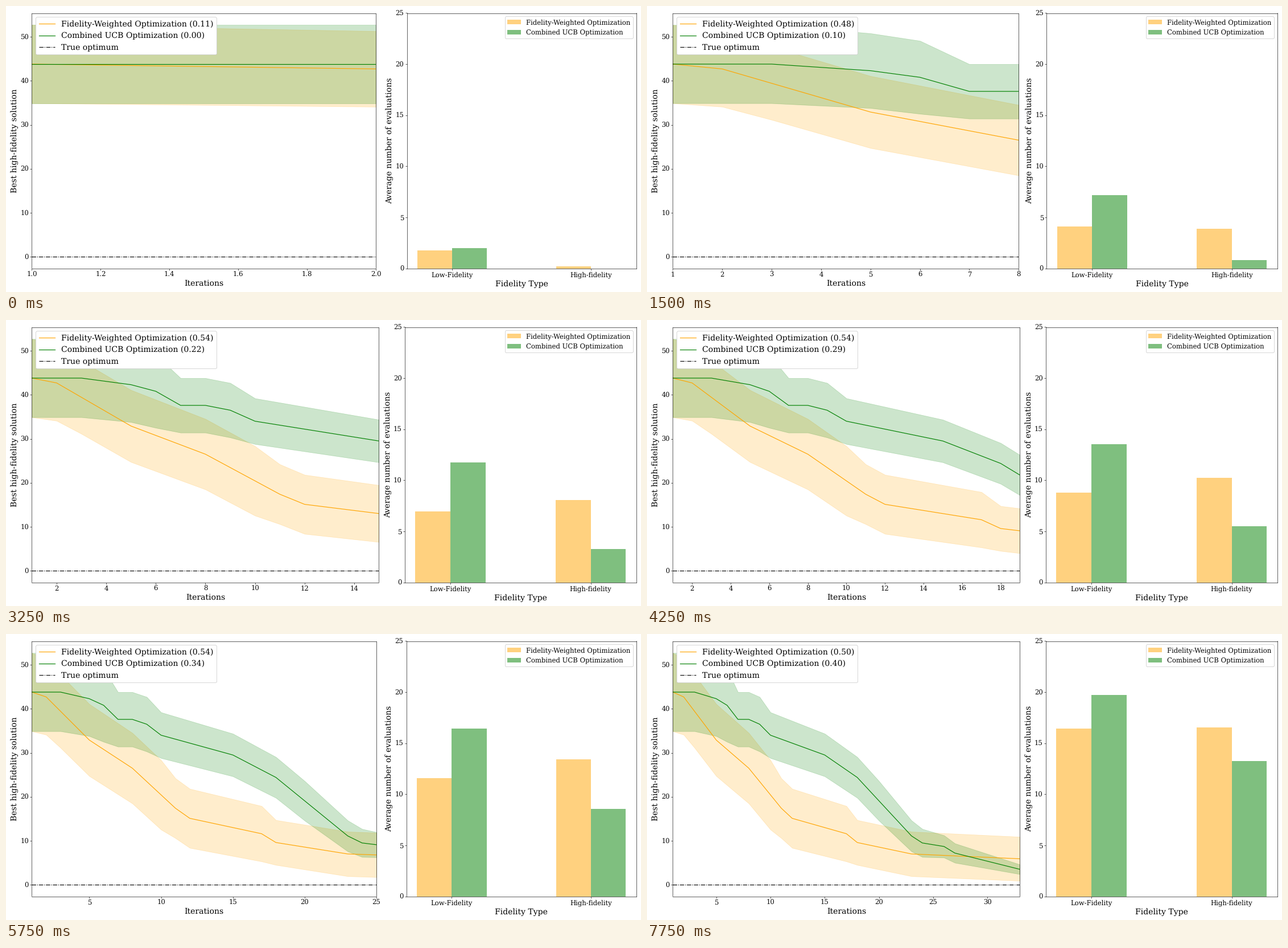
A matplotlib script for the animation above (8 s loop, 1116 by 502 pixels).

```python
import numpy as np
import matplotlib.pyplot as plt
from matplotlib.animation import FuncAnimation

WIDTH, HEIGHT, DPI = 1116, 502, 64
SCALE = WIDTH / 20 / DPI  # sizes below are given for a 20 inch wide figure
SMALL, LARGE = 15 * SCALE, 18 * SCALE
TOP, BOTTOM = 12.5, 460.5  # axes edges in pixels from the top
FRAMES, INTERVAL = 32, 250

for key in ("font.size", "lines.linewidth", "patch.linewidth", "axes.linewidth",
            "axes.labelpad", "xtick.major.size", "xtick.major.pad",
            "xtick.major.width", "ytick.major.size", "ytick.major.pad",
            "ytick.major.width"):
    plt.rcParams[key] *= SCALE
plt.rcParams.update({
    "font.family": "DejaVu Serif",
    "text.hinting": "none",  # keeps text heights fractional
    "axes.labelsize": LARGE,
    "xtick.labelsize": SMALL,
    "ytick.labelsize": SMALL,
    "legend.framealpha": 1,
})

iters = np.arange(1, FRAMES + 2)


def track(*points):
    """Value at every iteration, straight between (iteration, value) points."""
    return np.interp(iters, *zip(*points))


class Method:
    def __init__(self, name, color, mean, spread, high):
        self.name, self.color = name, color
        self.mean, self.spread, self.high = mean, spread, high


weighted = Method(
    "Fidelity-Weighted Optimization", "orange",
    mean=track((1, 43.8), (2, 42.7), (5, 32.9), (8, 26.5), (11, 17.4),
               (12, 15.1), (17, 11.6), (18, 9.6), (23, 7), (33, 5.9)),
    spread=track((1, 8.9), (3, 8.3), (10, 7.9), (11, 6.8), (17, 6.3),
                 (18, 5.1), (33, 5)),
    high=track((2, 0.22), (5, 1.82), (11, 5.94), (25, 13.42), (33, 16.56)))

combined = Method(
    "Combined UCB Optimization", "green",
    mean=track((1, 43.8), (3, 43.8), (5, 42.3), (6, 40.8), (7, 37.6), (8, 37.6),
               (9, 36.5), (10, 34), (15, 29.5), (18, 24.4), (23, 11.1),
               (24, 9.5), (26, 8.7), (27, 7.2), (33, 3.5)),
    spread=track((1, 8.9), (3, 8.9), (6, 8.3), (7, 6.2), (9, 6.2), (10, 5.2),
                 (20, 4.5), (27, 2.2), (33, 1.1)),
    high=track((2, 0), (5, 0.11), (11, 1.54), (15, 3.27), (19, 5.47),
               (25, 8.54), (33, 13.28)))

methods = (weighted, combined)

fig, (ax_line, ax_bar) = plt.subplots(
    1, 2, figsize=(WIDTH / DPI, HEIGHT / DPI), dpi=DPI,
    gridspec_kw={"width_ratios": [3, 2]})


def draw_progress(n):
    ax_line.clear()
    x = iters[:n]
    for m in methods:
        mean, spread = m.mean[:n], m.spread[:n]
        share = m.high[n - 1] / n
        ax_line.plot(x, mean, color=m.color, label=f"{m.name} ({share:.2f})")
        ax_line.fill_between(x, mean - spread, mean + spread,
                             color=m.color, alpha=0.2)
    ax_line.axhline(0, color="black", linestyle="-.", label="True optimum")
    ax_line.set_xlim(1, n)
    ax_line.set_ylim(-2.64, 55.39)
    ax_line.set_xlabel("Iterations")
    ax_line.set_ylabel("Best high-fidelity solution")
    ax_line.legend(loc="upper left", fontsize=LARGE)


def draw_counts(n):
    ax_bar.clear()
    width = 0.25
    for m, side in zip(methods, (-0.5, 0.5)):
        high = m.high[n - 1]
        ax_bar.bar(np.arange(2) + side * width, [n - high, high], width,
                   color=m.color, alpha=0.5, label=m.name)
    ax_bar.set_xlim(-0.325, 1.325)
    ax_bar.set_ylim(0, 25)
    ax_bar.set_xticks([0, 1], ["Low-Fidelity", "High-fidelity"])
    ax_bar.set_xlabel("Fidelity Type")
    ax_bar.set_ylabel("Average number of evaluations")
    ax_bar.legend(loc="upper right", fontsize=SMALL)


def update(frame):
    n = frame + 2
    draw_progress(n)
    draw_counts(n)
    # Refit each time: tick labels at the right edge change the spacing.
    fig.tight_layout()
    fig.subplots_adjust(top=1 - TOP / HEIGHT, bottom=1 - BOTTOM / HEIGHT)
    return []


anim = FuncAnimation(fig, update, frames=FRAMES, interval=INTERVAL,
                     init_func=lambda: update(0), repeat=True)
plt.show()
```
